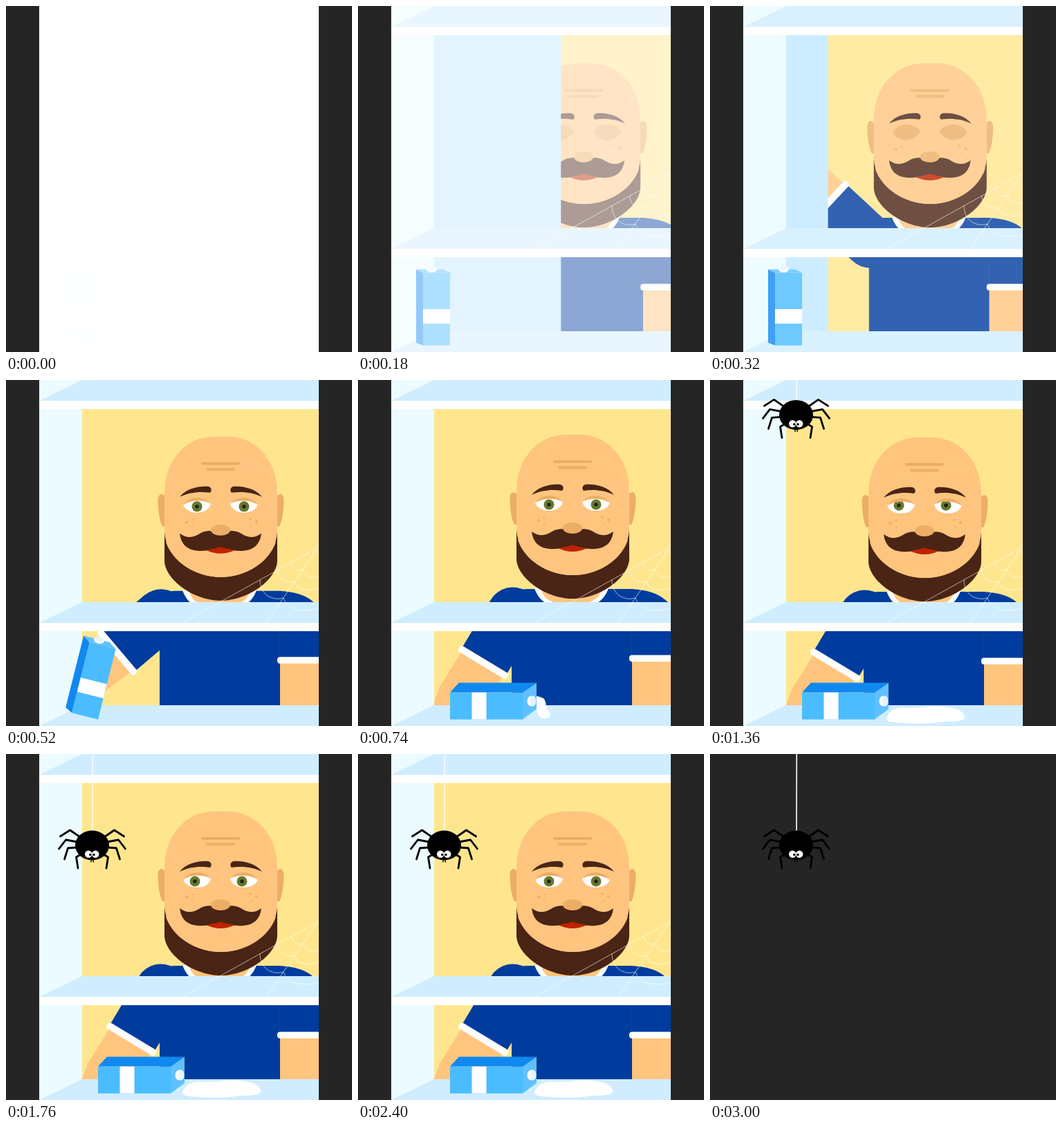
Write an HTML page with a canvas that moves like this. It is 500 by 500 pixels and loops after 3020 ms.

```html
<!DOCTYPE html>
<html lang="en">
<head>
<meta charset="utf-8">
<title>Empty fridge</title>
<style>
html, body { margin: 0; width: 100%; height: 100%; overflow: hidden; background: #252525; }
canvas { display: block; width: 500px; height: 500px; }
</style>
</head>
<body>
<canvas id="stage" width="500" height="500"></canvas>
<script>
const ctx = document.getElementById('stage').getContext('2d');
const LOOP = 3020, LIGHTS_OUT = 3000;
const C = {
  dark: '#252525', wall: '#ffe68e', side: '#ebfbff', shelf: '#d0edff', door: '#c2e7ff',
  skin: '#ffc57f', shade: '#ecad64', hair: '#4a2414', shirt: '#003c9e', mouth: '#bf2300',
  iris: '#66782f', box: '#4bbcff', boxDark: '#1088ef', boxEnd: '#5fc0ff'
};

const clamp = v => Math.max(0, Math.min(1, v));
const span = (t, a, b) => clamp((t - a) / (b - a));
const ease = p => (1 - Math.cos(Math.PI * p)) / 2;
const lerp = (a, b, p) => a + (b - a) * p;

function rect(x, y, w, h, color) {
  ctx.fillStyle = color;
  ctx.fillRect(x, y, w, h);
}
function round(x, y, w, h, r, color) {
  ctx.fillStyle = color;
  ctx.beginPath();
  ctx.roundRect(x, y, w, h, r);
  ctx.fill();
}
function oval(x, y, rx, ry, color) {
  ctx.fillStyle = color;
  ctx.beginPath();
  ctx.ellipse(x, y, rx, ry, 0, 0, Math.PI * 2);
  ctx.fill();
}
function shape(d, color) {
  ctx.fillStyle = color;
  ctx.fill(new Path2D(d));
}
function poly(points, color) {
  shape('M' + points.join('L') + 'Z', color);
}
function line(d, color, width) {
  ctx.strokeStyle = color;
  ctx.lineWidth = width;
  ctx.lineCap = ctx.lineJoin = 'round';
  ctx.stroke(new Path2D(d));
}
// Runs draw twice, the second time mirrored about x.
function mirrored(x, draw) {
  draw();
  ctx.save();
  ctx.translate(2 * x, 0);
  ctx.scale(-1, 1);
  draw();
  ctx.restore();
}

function arm(turn) {
  ctx.save();
  ctx.translate(224, 341);
  ctx.rotate((121 + turn) * Math.PI / 180);
  poly([[82, -35], [82, 35], [145, 36], [195, 27], [195, -27]], C.skin);
  oval(0, 0, 37.5, 37.5, C.shirt);
  rect(0, -37.5, 82, 75, C.shirt);
  round(78, -41, 10, 82, 4, '#fff');
  ctx.restore();
}

function eye(x, gaze, open) {
  ctx.save();
  ctx.translate(x, 184);
  shape('M-20 -1C-12 -16 10 -17 20 -3C11 13 -9 14 -20 -1Z', C.shade);
  if (open) {
    const white = new Path2D('M-20 -2C-10 -10 10 -10 20 -4C17 12 -13 14 -20 -2Z');
    ctx.clip(white);
    rect(-22, -15, 44, 30, '#fff');
    oval(gaze.x, gaze.y, 7.5, 7.5, C.iris);
    oval(gaze.x, gaze.y, 2.7, 2.7, '#20200f');
  }
  ctx.restore();
}

function head(gaze, open) {
  mirrored(310.5, () => shape('M230 170C225 163 219 166 219.5 177C220 195 223 208 226 213L230 213Z', C.shade));
  shape('M229 165C229 115 262 83 300 83H321C359 83 392 115 392 165V266H229Z', C.skin);
  shape('M229 221C231 256 268 286 310.5 286C353 286 390 256 392 221V262C392 288 352 320 310.5 320C269 320 229 288 229 262Z', C.hair);
  shape('M231 235C240 263 272 286 310.5 286C349 286 381 263 390 235Z', C.skin);
  line('M284 122H336M291 130.5H329', C.shade, 4);
  mirrored(310.5, () => {
    shape('M251 170C260 158 279 154 292 155C297 156 298 161 295 164C280 162 266 163 251 170Z', C.hair);
  });
  eye(276, gaze, open);
  ctx.save();
  ctx.translate(620.5, 0);
  ctx.scale(-1, 1);
  eye(276.5, { x: -gaze.x, y: gaze.y }, open);
  ctx.restore();
  [[261, 207, 2], [269, 203, 1.3], [269, 213, 1.2], [353, 202, 1.7], [362, 206, 2], [355, 213, 1]]
    .forEach(([x, y, r]) => oval(x, y, r, r, C.shade));
  mirrored(310, () => {
    shape('M251 223C262 231 272 229 282 222C293 217 302 219 311 226V243C300 246 289 249 277 248C262 247 253 239 251 223Z', C.hair);
  });
  shape('M289 247Q300 246 310 242.5Q320 246 331 247Q310 257 289 247Z', C.mouth);
  oval(310, 218, 14, 8, C.shade);
}

function man(t, drop) {
  const dx = 27 * (1 - span(t, 0, 450));
  const dy = -4 * Math.sin(Math.PI * span(t, 400, 1080)) ** 2;
  const look = ease(span(t, 1000, 1200)) * (1 - ease(span(t, 1940, 2100)));
  const open = t > 420 && !(t >= 2280 && t < 2400);
  ctx.save();
  ctx.translate(dx, dy);
  shape('M222 480V322Q224 306 245 306H396Q428 308 443 321L480 350V402H396V480Z', C.shirt);
  rect(396, 404, 100, 80, C.skin);
  rect(395.5, 364, 0.7, 38, '#1a4b9f');
  round(392, 401.5, 100, 9.5, 4, '#fff');
  arm(102 * (1 - ease(span(t, 320, 600))) * (t < 320 ? 1 : 1));
  shape('M255 305C260 318 268 334 308 334C348 334 357 318 362 305Z', '#fff');
  shape('M264 305C268 318 274 328 308 328C342 328 349 318 353 305Z', C.skin);
  head({ x: -3 * look, y: -6 * (1 - drop) * look }, open);
  ctx.restore();
}

function web() {
  line('M451 242L257 350M451 242L376 351' +
    'M367 289C367 308 382 320 401 315C406 331 428 337 452 330' +
    'M393 274C393 288 404 295 417 291C422 306 439 306 452 300' +
    'M413 263C414 272 421 277 429 274C433 285 443 287 452 284', 'rgba(255,255,255,.6)', 1);
}

function fridge() {
  rect(48, 0, 62, 500, C.side);
  poly([[48, 30], [110, 0], [452, 0], [452, 30]], C.shelf);
  poly([[48, 351], [110, 321], [452, 321], [452, 351]], C.shelf);
  poly([[48, 500], [110, 470], [452, 470], [452, 500]], C.shelf);
  rect(48, 30, 404, 12, '#fff');
  rect(48, 351, 404, 12, '#fff');
}

// Tips over its lower right edge; the far corners shift with the view.
function carton(t) {
  const p = span(t, 430, 660) ** 2;
  const far = (a, b) => [lerp(a[0], b[0], p), lerp(a[1], b[1], p)];
  const base = far([4, -49], [13, -53]);
  const top = far([110, -49], [125, -53]);
  const low = far([110, -10], [125, -15]);
  ctx.save();
  ctx.translate(133, 490.5);
  ctx.rotate((p - 1) * Math.PI / 2);
  poly([[0, -39], base, top, [105, -39]], C.boxDark);
  poly([[105, -39], top, low, [105, 0]], C.boxEnd);
  rect(0, -39, 105, 39, C.box);
  rect(31.5, -39, 21, 39, '#fff');
  oval(lerp(110, 117.5, p), -26.5, lerp(4.5, 6, p), 7.5, '#fff');
  oval(lerp(111.5, 120, p), -26.5, lerp(3, 4.5, p), lerp(6, 7.5, p), '#e4f4ff');
  ctx.restore();
}

function milk(t) {
  const pour = span(t, 660, 740), stop = span(t, 960, 1080);
  const spread = ease(span(t, 740, 1100));
  if (spread > 0) {
    ctx.save();
    ctx.translate(268, 486);
    ctx.scale(spread, spread);
    ctx.translate(-268, -486);
    shape('M256 487C260 475 273 472 289 474C305 475 322 469 342 473C356 474 367 478 368 487C366 496 346 492 329 495C308 498 286 496 270 495C259 495 253 492 256 487Z', '#fff');
    ctx.restore();
  }
  if (pour > 0 && stop < 1) {
    ctx.save();
    ctx.beginPath();
    ctx.rect(240, lerp(450, 490, stop), 50, lerp(8, 40, pour));
    ctx.clip();
    shape('M246 459C252 455 260 456 268 460C272 464 271 469 273 475C277 480 279 484 277 487C273 490 268 490 264 488C260 485 259 480 257 476C256 472 251 472 247 470C243 466 243 461 246 459Z', '#fff');
    ctx.restore();
  }
}

function spider(y, thread) {
  line(`M125.3 -5L125 ${y - 20}`, thread, 1.7);
  ctx.save();
  ctx.translate(124.5, y);
  mirrored(0, () => line('M-19 -13L-32 -22L-46 -13M-22 -5L-38 -8L-48 5' +
    'M-22 3L-35 4L-40 20M-18 14L-23 17L-20.5 33', '#000', 2.8));
  oval(0, 0, 24.5, 21.5, '#000');
  line('M-1.5 20V24M1.8 20V24', '#000', 1.4);
  oval(-5.3, 12.8, 5.2, 5.2, '#fff');
  oval(4.7, 12.8, 5.2, 5.2, '#fff');
  oval(-2.7, 13.5, 1.8, 1.8, '#000');
  oval(2.5, 13.5, 1.8, 1.8, '#000');
  ctx.restore();
}

function draw(t) {
  const drop = ease(span(t, 920, 1760));
  const spiderY = lerp(-45, 132, drop);
  rect(0, 0, 500, 500, C.dark);
  if (t >= LIGHTS_OUT) {
    spider(spiderY, '#f4f4f4');
    return;
  }
  ctx.save();
  ctx.beginPath();
  ctx.rect(48, 0, 404, 500);
  ctx.clip();
  rect(48, 0, 404, 500, C.wall);
  man(t, drop);
  rect(110, 0, 342 * (1 - span(t, 0, 390)), 500, C.door);
  fridge();
  web();
  milk(t);
  carton(t);
  spider(spiderY, 'rgba(255,255,255,.75)');
  rect(48, 0, 404, 500, `rgba(255,255,255,${1 - span(t, 0, 400)})`);
  ctx.restore();
}

const start = performance.now();
function tick() {
  draw((performance.now() - start) % LOOP);
  requestAnimationFrame(tick);
}
tick();
</script>
</body>
</html>
```
